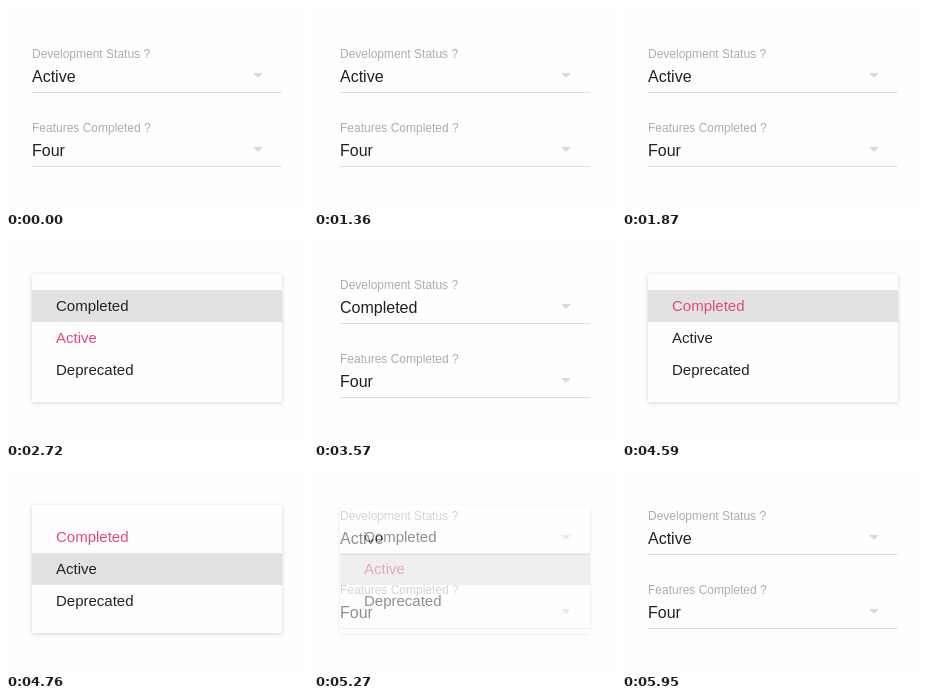
Recreate the animation shown at these times as an HTML page. Size 302 by 203 pixels, loop 6120 ms.

```html
<!DOCTYPE html>
<html lang="en">
<head>
<meta charset="utf-8">
<title>Select menu</title>
<style>
html, body { margin: 0; width: 100%; height: 100%; overflow: hidden; background: #fefefe; }
svg { display: block; width: 302px; height: 203px; font-family: "Liberation Sans", Arial, sans-serif; }
.label { font-size: 12px; fill: #adadad; }
.value { font-size: 16px; fill: #212121; }
.item { font-size: 15px; fill: #2a2022; }
.item.chosen { fill: #e5477f; }
.menu { filter: drop-shadow(0 1px 2px rgba(0, 0, 0, .17)); }
</style>
</head>
<body>
<svg viewBox="0 0 302 203">
  <g id="fields"></g>
  <g id="menu">
    <rect class="menu" x="26" y="37" width="250" height="128" fill="#fefefe"/>
    <rect id="hover" x="26" width="250" height="32" fill="#e2e2e2"/>
  </g>
</svg>
<script>
const STEP = 170, LOOP = 6120;
const options = ["Completed", "Active", "Deprecated"];

// start time, selected option, hovered option, menu opacity
const states = [
  [0, 1, 0, 0],
  [2040, 1, 0, 0.5],
  [2210, 1, 0, 1],
  [3230, 0, 0, 0.5],
  [3400, 0, 0, 0],
  [4250, 0, 0, 0.5],
  [4420, 0, 0, 1],
  [4760, 0, 1, 1],
  [5270, 1, 1, 0.5],
  [5440, 1, 1, 0]
];

const fields = document.getElementById("fields");
const menu = document.getElementById("menu");
const hover = document.getElementById("hover");

function add(parent, tag, attrs, text = "") {
  const el = document.createElementNS("http://www.w3.org/2000/svg", tag);
  for (const key in attrs) el.setAttribute(key, attrs[key]);
  el.textContent = text;
  parent.append(el);
  return el;
}

function addField(y, label, value) {
  add(fields, "text", { class: "label", x: 26, y: y + 52 }, label);
  const text = add(fields, "text", { class: "value", x: 26, y: y + 76 }, value);
  add(fields, "path", { d: `M247 ${y + 67}h10l-5 5z`, fill: "#d9d9d9" });
  add(fields, "rect", { x: 26, y: y + 86, width: 250, height: 1, fill: "#dedede" });
  return text;
}

const status = addField(0, "Development Status ?", "Active");
addField(74, "Features Completed ?", "Four");
const items = options.map((name, i) =>
  add(menu, "text", { class: "item", x: 50, y: 74 + 32 * i }, name));

let shown;
function draw(now) {
  const time = Math.floor((now % LOOP) / STEP) * STEP;
  const state = states.findLast(s => s[0] <= time);
  if (state !== shown) {
    const [, selected, hovered, opacity] = shown = state;
    status.textContent = options[selected];
    items.forEach((el, i) => el.classList.toggle("chosen", i === selected));
    hover.setAttribute("y", 53 + 32 * hovered);
    menu.setAttribute("opacity", opacity);
  }
}

const start = performance.now();
function tick() {
  draw(performance.now() - start);
  requestAnimationFrame(tick);
}
tick();
</script>
</body>
</html>
```
